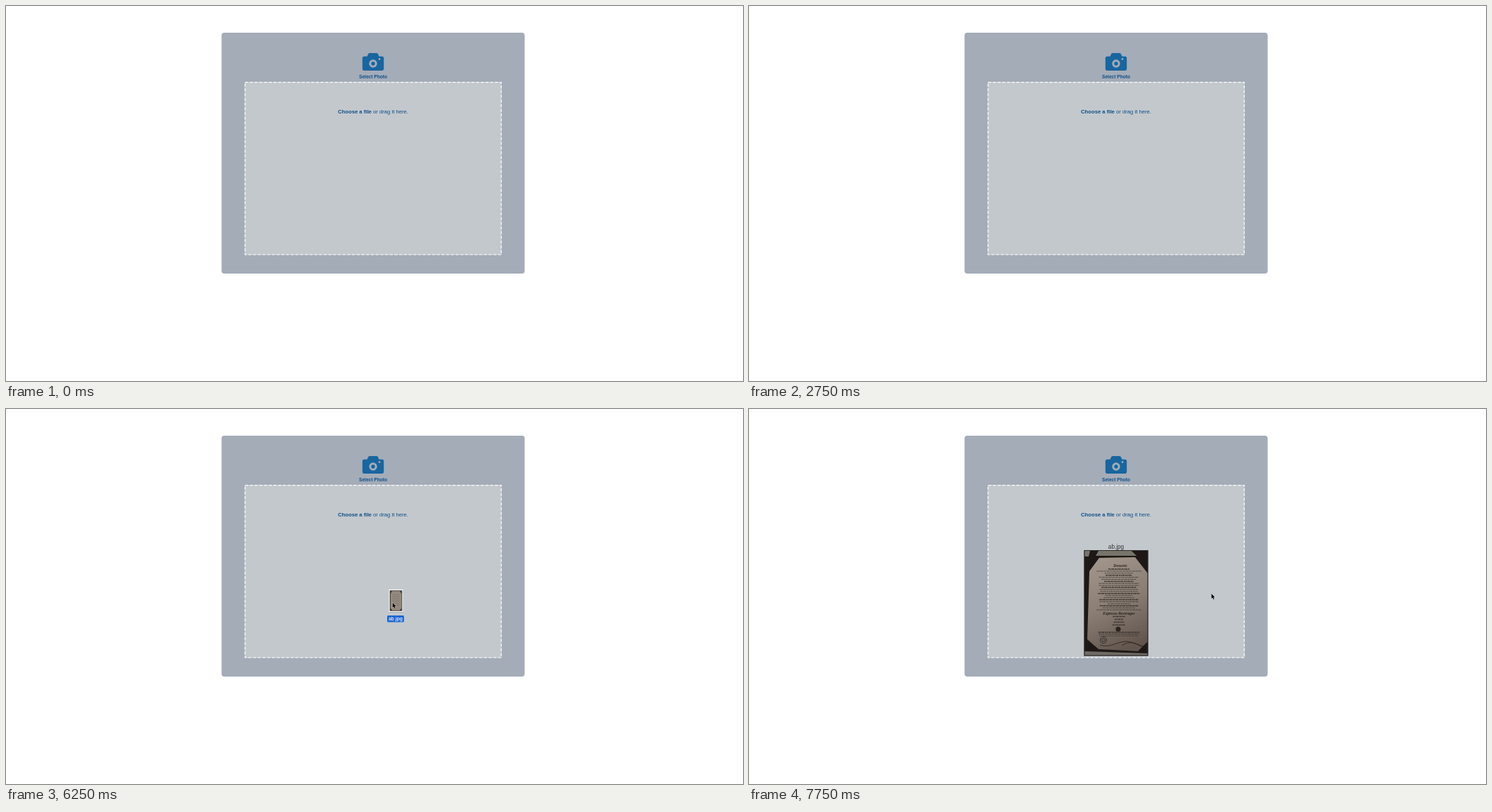
Write an HTML page that moves like this. It is 1048 by 534 pixels and loops after 8000 ms.

```html
<!DOCTYPE html>
<html lang="en">
<head>
<meta charset="utf-8">
<title>Photo drop zone</title>
<style>
  html, body { margin: 0; width: 100%; height: 100%; overflow: hidden; background: #fff; }
  svg { display: block; width: 1048px; height: 534px; }
  text { font-family: "Liberation Sans", Arial, sans-serif; text-anchor: middle; }
  .blue { fill: #0f4f8a; }
  .bold { font-weight: 700; }
  .script { font: italic 700 5.6px "Liberation Serif", serif; fill: #29231f; }
</style>
</head>
<body>
<svg viewBox="0 0 1048 534">
  <defs>
    <linearGradient id="paper" x1=".3" y1="0" x2=".6" y2="1">
      <stop offset="0" stop-color="#a1958b"/>
      <stop offset=".5" stop-color="#897d74"/>
      <stop offset="1" stop-color="#61554d"/>
    </linearGradient>
    <clipPath id="edge"><rect width="100.5" height="534"/></clipPath>
  </defs>

  <rect x="306.5" y="38" width="431" height="343" rx="4" fill="#a4acb8"/>
  <rect x="339.5" y="108" width="365" height="246.5" fill="#c3c8cc"/>
  <rect x="340" y="108.6" width="364.2" height="245.4" fill="none" stroke="#fff"
        stroke-width="1.2" stroke-dasharray="4.5 2.2"/>

  <g fill="#18669f">
    <path d="M509.5 71.7h4l1.6-3.4q.6-1.4 2.2-1.4h9.4q1.6 0 2.2 1.4l1.6 3.4h4q2.7 0 2.7 2.7v14.8q0 2.7-2.7 2.7h-25q-2.7 0-2.7-2.7v-14.8q0-2.7 2.7-2.7z"/>
    <circle cx="522" cy="82" r="4.2" stroke="#a4acb8" stroke-width="3"/>
    <circle cx="531" cy="75.6" r="1.4" fill="#a4acb8"/>
  </g>
  <text class="blue bold" x="522" y="103" font-size="6.6">Select Photo</text>
  <text class="blue" x="522" y="153" font-size="7.7"><tspan class="bold">Choose a file</tspan> or drag it here.</text>

  <g id="preview">
    <text x="522" y="199" font-size="8.2" fill="#333">ab.jpg</text>
    <rect x="476.5" y="201" width="91" height="150.5" fill="#1d1816"/>
    <path d="M477 202h8l-2 8h-6zM497 202h47l7 7h-58z" fill="#77756b"/>
    <path d="M477 345L567 348V351H477z" fill="#6f6a63"/>
    <path d="M498 212L549 211L567 234V331L553 345L497 342L481 328L484 231z" fill="url(#paper)"/>
    <g id="print" stroke="#3c342f"></g>
    <text class="script" x="528" y="225">Desserts</text>
    <text class="script" x="526" y="293">Espresso Beverages</text>
    <circle cx="525" cy="313.5" r="3.6" fill="#2a2420"/>
    <g fill="none" stroke="#29231f" stroke-width=".8">
      <circle cx="504" cy="329" r="4.6"/><circle cx="504" cy="329" r="2.2"/>
      <path d="M499 336C515 342 528 327 543 332S557 338 566 337M530 337C540 330 550 332 560 340"/>
    </g>
    <rect x="477" y="201.5" width="90" height="149.5" fill="none" stroke="#2b2a29"/>
  </g>

  <g id="clip"><g id="file">
    <rect x="2.5" y="1" width="20.5" height="32" fill="#777" opacity=".35"/>
    <rect x="2.5" width="20" height="32" fill="#fff"/>
    <rect x="3.7" y="1.3" width="17.6" height="29.4" fill="#3b3835"/>
    <path d="M7 2.3h11l2.4 4v20l-2.4 3.4H7l-2.2-3.4v-20z" fill="#94897e"/>
    <path d="M12.5 7v16" stroke="#81776d" stroke-width="10" stroke-dasharray=".7 2.3"/>
    <rect y="37" width="24" height="9.6" rx="1.5" fill="#1e66d2"/>
    <text x="12" y="44" fill="#fff" style="font:500 6.7px Inter,sans-serif">ab.jpg</text>
  </g></g>

  <path id="cursor" d="M.6 .6V7.5L2.2 6.1L3.3 8.7L4.5 8.2L3.4 5.7H5.5z"
        stroke="#fff" stroke-width=".6" paint-order="stroke" stroke-linejoin="round"/>
</svg>
<script>
const LOOP = 8000;
const STEP = 250;          // the pointer is sampled four times a second
const DROP = 7000;
const GRIP = [7.2, 18.3];  // pointer position within the dragged file

// Pointer or file positions, one per step from each start time
const approach = { start: 500, path: [
  [755, 112], [599, 184], [559, 193], [572, 190], [534, 170],
  [400, 175.5], [390, 177.5], [330, 181.5], [177, 209.5]
] };
const drag = { start: 5500, path: [[85.5, 75], [356, 75], [496, 146], [542, 257], [517, 269], [517, 269]] };
const leave = { start: DROP, path: [[524, 287.5], [525, 282], [656, 262], [657, 262.5]] };

const el = id => document.getElementById(id);
const show = (node, on) => node.style.display = on ? "" : "none";
const move = (node, x, y) => node.setAttribute("transform", `translate(${x} ${y})`);
const sample = ({ start, path }, t) => path[Math.floor((t - start) / STEP)];

let seed = 7;
const random = () => (seed = seed * 16807 % 2147483647) / 2147483647;

// Rows of broken strokes that read as print; every third row is a heavy title.
function printRows(top, bottom, gap, width, spread, titleEvery) {
  let rows = "";
  for (let y = top, i = 0; y <= bottom; y += gap, i++) {
    const w = width + spread * (random() - .5);
    const weight = i % titleEvery ? .8 : 1.5;
    rows += `<path d="M${526 - w / 2} ${y}h${w}" stroke-width="${weight}" stroke-dasharray="2.6 .5 1.4 .5 3.5 .8"/>`;
  }
  return rows;
}
el("print").innerHTML =
  printRows(228, 286, 2.9, 48, 36, 3) +
  printRows(295.5, 308, 4, 15, 8, 1) +
  printRows(318, 323, 2.5, 54, 24, 9);

function draw(now) {
  const t = now % LOOP;
  const filePos = sample(drag, t);
  const cursorPos = filePos
    ? filePos.map((v, i) => v + GRIP[i])
    : sample(approach, t) || sample(leave, t);

  show(el("preview"), t >= DROP);
  show(el("file"), filePos);
  show(el("cursor"), cursorPos);
  if (filePos) move(el("file"), ...filePos);
  if (cursorPos) move(el("cursor"), ...cursorPos);
  // The file first enters half hidden by the window edge.
  el("clip").setAttribute("clip-path", t < drag.start + STEP ? "url(#edge)" : "none");
  requestAnimationFrame(draw);
}
requestAnimationFrame(draw);
</script>
</body>
</html>
```
